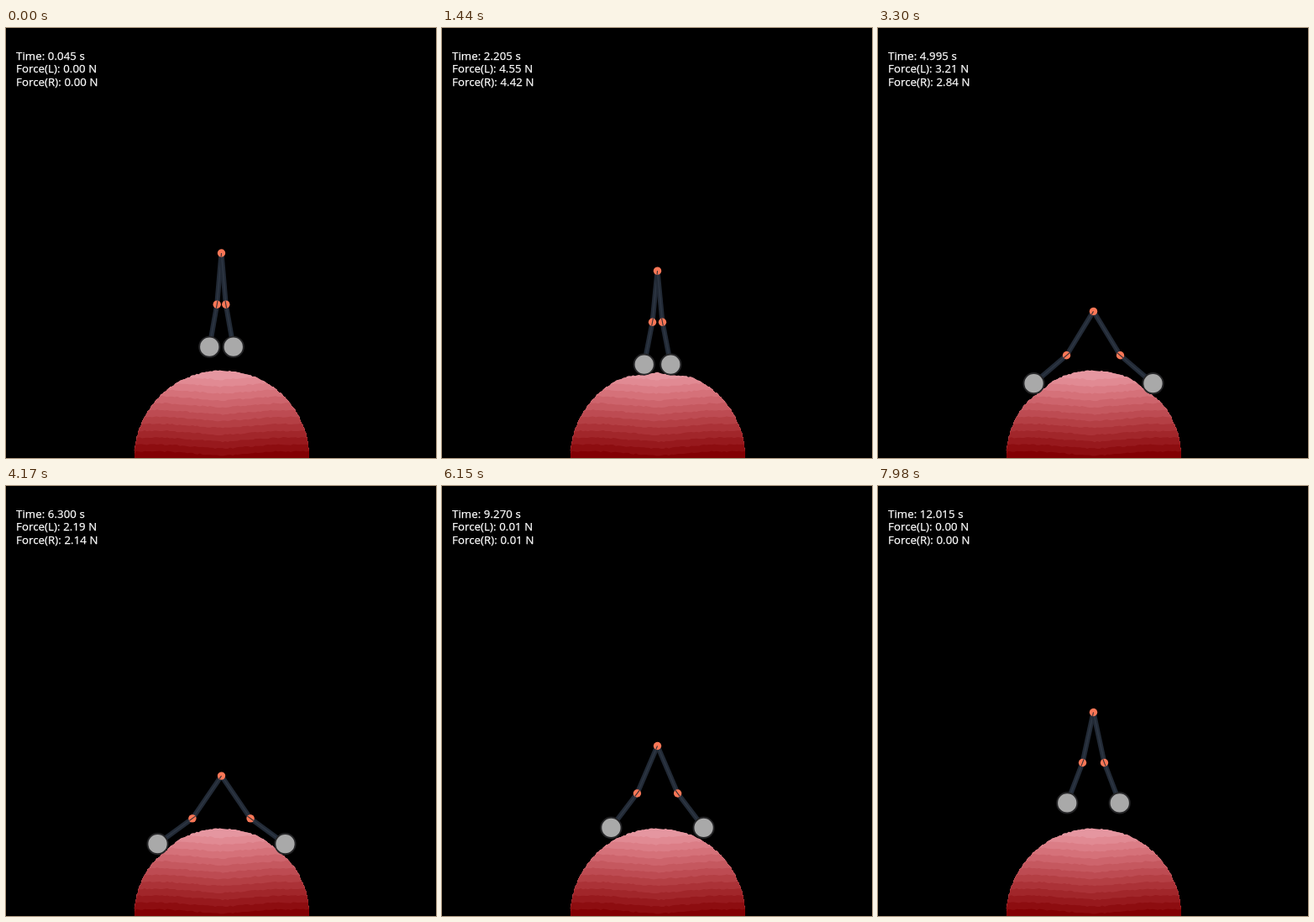
Animation of 512x512 px, one loop 8 s. Source, as an HTML page:

```html
<!DOCTYPE html>
<html lang="en">
<head>
<meta charset="utf-8">
<title>Gripper on a soft ball</title>
<style>
  html, body { margin: 0; width: 100%; height: 100%; overflow: hidden; background: #000; }
  svg { display: block; width: 100vw; height: 100vh; }
  text { font: 13.2px "Open Sans", "Noto Sans", sans-serif; letter-spacing: .1px; fill: #fff; stroke: #fff; stroke-width: .25; white-space: pre; }
  .link { stroke: #222a36; stroke-width: 6; }
  .core { stroke: #2d3643; stroke-width: 1.6; }
  .joint { fill: #fb7757; }
  .tick { stroke: #352e33; stroke-width: 1.1; }
  .foot { fill: #a9a9a9; stroke: #262628; stroke-width: 1.9; }
</style>
</head>
<body>
<svg id="stage" viewBox="0 0 512 512">
  <rect width="512" height="512"/>
  <clipPath id="ballClip"><path id="ballShape"/></clipPath>
  <g id="ball" clip-path="url(#ballClip)"></g>
  <g id="arm"></g>
  <text id="time" x="12" y="38"></text>
  <text id="left" x="12" y="53"></text>
  <text id="right" x="12" y="69"></text>
</svg>
<script>
const LOOP = 8000, STEP = 30;
const CX = 256.5, BALL_X = 257, BALL_Y = 512, BALL_R = 104;
const UPPER = 61.4, LOWER = 51.3, REST = 0.0863, TOUCH = 116.6;
const START = 1250, RELEASE = 5700;

// [ms, value] knots
const REACH = [[1250, 116.8], [1440, 112.5], [2520, 112.55], [3300, 113.7], [4159, 114.6], [5040, 115.3], [5700, 116.6]];
const FORCE_L = [[1250, 0], [1440, 4.55], [2520, 3.64], [3300, 3.21], [4159, 2.2], [5040, 1.34], [5700, .3], [6150, .01], [6300, 0]];
const FORCE_R = [[1250, 0], [1440, 4.42], [2520, 4.19], [3300, 2.84], [4159, 2.15], [5040, 1.32], [5700, .3], [6150, .01], [6300, 0]];

const $ = id => document.getElementById(id);

function add(parent, tag, attrs) {
  const el = document.createElementNS("http://www.w3.org/2000/svg", tag);
  set(el, attrs);
  parent.appendChild(el);
  return el;
}

function set(el, attrs) {
  for (const k in attrs) el.setAttribute(k, attrs[k]);
}

function lerpKnots(knots, t) {
  if (t <= knots[0][0]) return knots[0][1];
  for (let i = 1; i < knots.length; i++) {
    const [t0, v0] = knots[i - 1], [t1, v1] = knots[i];
    if (t <= t1) return v0 + (v1 - v0) * (t - t0) / (t1 - t0);
  }
  return knots[knots.length - 1][1];
}

let seed = 11;
function rand() {
  seed = (seed * 16807) % 2147483647;
  return seed / 2147483647;
}

// Ball: jagged shaded bands inside a jagged outline
const BANDS = 13;
const rough = Array.from({ length: 141 }, () => rand() * 1.2 - 0.5);

function buildBall() {
  for (let i = 0; i < BANDS; i++) {
    const f = i / (BANDS - 1);
    const mix = (a, b, power) => Math.round(a + (b - a) * Math.pow(f, power));
    const top = i ? 405 + i * 8.2 : 400;
    let d = "M150 514";
    for (let x = 150; x <= 364; x += 3) {
      const u = Math.abs(x - BALL_X) / BALL_R;
      const y = top + 5 * Math.max(0, 1 - u * 1.6) + rand() * 1.6;
      d += `L${x} ${y.toFixed(1)}`;
    }
    const fill = `rgb(${mix(229, 130, 1.3)},${mix(150, 0, 1)},${mix(160, 3, 1)})`;
    add($("ball"), "path", { d: d + "L364 514Z", fill });
  }
}

function ballOutline(foot, dent) {
  const footAngle = Math.atan2(foot.x, BALL_Y - foot.y);
  const n = rough.length - 1;
  let d = "";
  for (let i = 0; i <= n; i++) {
    const a = (i / n - 0.5) * Math.PI;
    const gap = (Math.abs(a) - footAngle) * BALL_R / 12;
    const r = BALL_R + rough[i] - dent * Math.exp(-gap * gap / 2);
    d += `${i ? "L" : "M"}${(BALL_X + r * Math.sin(a)).toFixed(2)} ${(BALL_Y - r * Math.cos(a)).toFixed(2)}`;
  }
  return d + "Z";
}

// Arm: both fingers share one opening angle
const bend = a => 0.047 + 1.49 * a;

function finger(a, hipY) {
  const b = bend(a);
  const knee = { x: UPPER * Math.sin(a), y: hipY + UPPER * Math.cos(a) };
  const foot = { x: knee.x + LOWER * Math.sin(b), y: knee.y + LOWER * Math.cos(b) };
  return { knee, foot };
}

function angleForReach(reach, hipY) {
  let lo = 0, hi = 1.2;
  for (let i = 0; i < 30; i++) {
    const mid = (lo + hi) / 2, { foot } = finger(mid, hipY);
    if (Math.hypot(foot.x, BALL_Y - foot.y) < reach) lo = mid; else hi = mid;
  }
  return lo;
}

function opening(t, hipY) {
  if (t < START) return REST;
  if (t > RELEASE) return 0.03 + 0.445 * Math.exp(-0.00039 * (t - RELEASE));
  return Math.max(REST, angleForReach(lerpKnots(REACH, t), hipY));
}

const arm = $("arm");
const make = (tag, cls, attrs) => add(arm, tag, { class: cls, ...attrs });
const sides = [-1, 1].map(sign => ({
  sign,
  upper: [make("line", "link"), make("line", "core")],
  lower: [make("line", "link"), make("line", "core")]
}));
for (const s of sides) {
  s.foot = make("circle", "foot", { r: 12.1 });
  s.knee = make("circle", "joint", { r: 4.7 });
  s.tick = make("line", "tick");
}
const hip = make("circle", "joint", { r: 4.7, cx: CX });
const hipTick = make("line", "tick");

function place(line, x1, y1, x2, y2) {
  set(line, { x1, y1, x2, y2 });
}

function draw(ms) {
  const frame = Math.floor(ms / STEP), t = frame * STEP;
  const clock = (frame + 1) * 0.045;
  const hipY = 268 + 38.55 * (1 - Math.cos(clock / 2));
  const a = opening(t, hipY), b = bend(a);
  const { knee, foot } = finger(a, hipY);

  for (const s of sides) {
    const kx = CX + s.sign * knee.x, fx = CX + s.sign * foot.x;
    const dx = s.sign * 4.5 * Math.sin(b), dy = 4.5 * Math.cos(b);
    s.upper.forEach(l => place(l, CX, hipY, kx, knee.y));
    s.lower.forEach(l => place(l, kx, knee.y, fx, foot.y));
    set(s.foot, { cx: fx, cy: foot.y });
    set(s.knee, { cx: kx, cy: knee.y });
    place(s.tick, kx - dx, knee.y - dy, kx + dx, knee.y + dy);
  }
  set(hip, { cy: hipY });
  place(hipTick, CX, hipY, CX - 4.5 * Math.sin(a), hipY + 4.5 * Math.cos(a));

  const dent = t >= START && t <= RELEASE ? Math.max(0, TOUCH - lerpKnots(REACH, t)) : 0;
  set($("ballShape"), { d: ballOutline(foot, dent) });

  $("time").textContent = `Time: ${clock.toFixed(3)} s`;
  $("left").textContent = `Force(L): ${lerpKnots(FORCE_L, t).toFixed(2)} N`;
  $("right").textContent = `Force(R): ${lerpKnots(FORCE_R, t).toFixed(2)} N`;
}

buildBall();
draw(0);
const began = performance.now();
(function tick() {
  draw((performance.now() - began) % LOOP);
  requestAnimationFrame(tick);
})();
</script>
</body>
</html>
```
